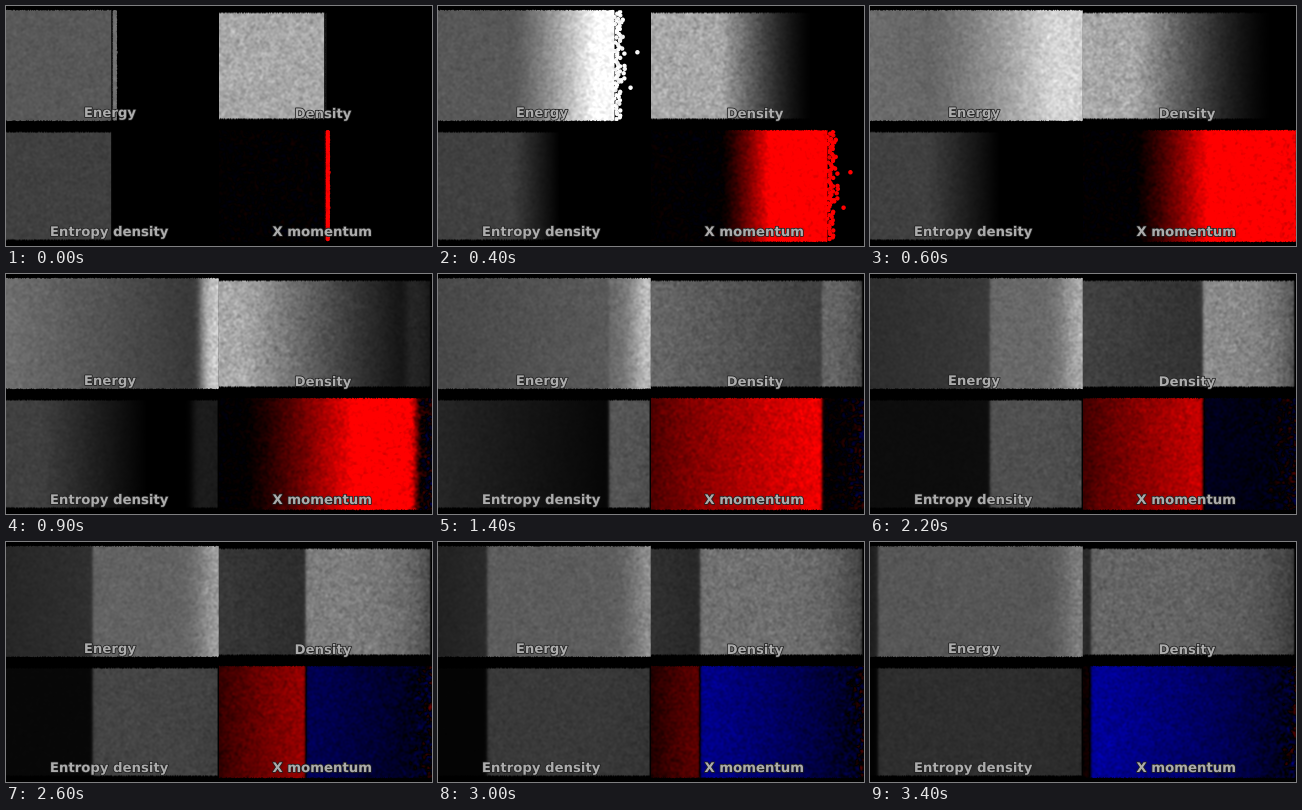
These frames come from a looping animation (426x240 px, 3500 ms). A matplotlib script:

```python
import numpy as np
import matplotlib.pyplot as plt
from matplotlib.animation import FuncAnimation
from matplotlib.patheffects import withStroke

W, H, DPI = 426, 240, 64
FRAMES, STEP = 35, 100
PW, WALL = 213, 212     # panel width, right wall
START = 106             # initial edge of the gas
SPEED = 18.5            # free front, pixels per step

x = np.arange(PW) + 0.5
d = WALL - x            # distance from the wall


def ramp(v, a, b):
    return np.clip((v - a) / (b - a), 0, 1)


def mix(a, b, k):
    return a + (b - a) * k


def shock_at(t):
    """The reflected shock leaves the wall and speeds up leftwards."""
    return 187 + 10 * max(9 - t, 0) - 1.432 * max(t - 9, 0) ** 1.5


# Each field gives the state ahead of the shock and the state behind it.
# xi is the self-similar coordinate of the expansion, u the place from the
# left wall (0) to the shock (1).

def energy(t, xi, u):
    fan = 88 + 165 * min(t, 1) * ramp(xi, -8, 13) ** 1.3
    slope = mix(-0.5, 0.25, ramp(t, 9, 13))
    late = 1000 / t * (1 + slope * u)
    glow = 120 * (1 - t / 50) * np.exp(-(d / 20) ** 2)
    behind = 104 - 18 * ramp(t, 22, 34) + glow
    return mix(fan, late, ramp(t, 5, 9)), behind


def density(t, xi, u):
    fan = 168 * ramp(xi, 14, -9) ** 1.45
    late = min(168, 1450 / t) * (1 - 5.5 / max(t, 9) * u)
    level = 146 * ramp(t, 6, 17) * (1 - 0.022 * max(t - 20, 0))
    behind = level * (1 - 0.45 * np.exp(-d / t))
    return mix(fan, late, ramp(t, 9, 13)), behind


def entropy(t, xi, u):
    fan = 64 * ramp(xi, 4, -8)
    late = 38 * np.exp((14 - t) / 7.5) * (1 - 0.85 * u * ramp(t, 22, 14))
    level = 86 * ramp(t, 7, 13) * (1 - 0.033 * max(t - 20, 0))
    behind = level * (1 - 0.1 * np.exp(-d / t))
    return mix(fan, late, ramp(t, 9, 13)), behind


def momentum(t, xi, u):
    fan = 262 * ramp(xi, -9, 3.5) ** 1.3
    peak = 245 * (1 - (max(t - 12, 0) / 23) ** 2)
    late = peak * (0.3 + 0.7 * u ** 0.8)
    reach = np.clip(d / max(WALL - shock_at(t), 20), 0, 1)
    behind = -155 * ramp(t, 20, 31) * reach ** 0.6
    return mix(fan, late, ramp(t, 9, 13)), behind


class Panel:
    def __init__(self, field, left, top, bottom, right, grain, soft, lead=0,
                 signed=False):
        self.field, self.left = field, left
        self.top, self.bottom, self.right = top, bottom, right
        self.grain, self.soft, self.lead, self.signed = grain, soft, lead, signed


PANELS = [
    Panel(energy, 0, 4, 115, 213, 0.035, 1, lead=7),
    Panel(density, 213, 6.5, 113, 211.5, 0.05, 1.8),
    Panel(entropy, 0, 126, 234, 212, 0.04, 1.8),
    Panel(momentum, 213, 124, 236, 213, 0.03, 1, lead=10, signed=True),
]

# Particles of the ragged front, then the fast strays: speed and height
rng = np.random.default_rng(4)
dot_speed = np.concatenate([rng.uniform(17.5, 19.1, 64),
                            19.2 + rng.exponential(1, 14)])
dot_y = np.concatenate([np.linspace(2, 109, 64), rng.uniform(3, 109, 14)])


def noise(rng, h):
    """Soft random field with unit variance."""
    n = rng.normal(size=(h + 4, PW + 4))
    for _ in range(2):
        n = 0.5 * n[:-2] + n[1:-1] + 0.5 * n[2:]
        n = 0.5 * n[:, :-2] + n[:, 1:-1] + 0.5 * n[:, 2:]
    return n / n.std()


def gas_mask(t, y):
    """Coverage of the gas while its front still flies to the wall."""
    mask = np.tile(np.clip(START + SPEED * t - 3 - x, 0, 1), (len(y), 1))
    for speed, cy in zip(dot_speed, dot_y):
        cx = START + speed * t
        cx -= 1.4 * max(cx - WALL, 0)
        r = np.hypot(x[None, :] - cx, y[:, None] - cy)
        mask = np.maximum(mask, np.clip(2.7 - r, 0, 1))
    return mask


def render(p, t, rng):
    y0, y1 = int(p.top) - 1, min(int(p.bottom) + 3, H)
    y = np.arange(y0, y1)[:, None] + 0.5

    s = shock_at(t)
    ahead, behind = p.field(t, (x - START) / t, np.clip(x / s, 0, 1))
    front = s + p.lead * ramp(t, 13, 9)
    width = mix(3, 0.8, ramp(t, 7, 13))
    v = mix(ahead, behind, 1 / (1 + np.exp(np.clip((front - x) / width, -40, 40))))

    near_wall = np.exp(-d / 14) * ramp(t, 5, 8)
    amp = p.grain * np.abs(v) * (1 + 0.5 * near_wall)
    if p.signed:
        amp = amp + 5 + 28 * near_wall
    field = v + amp * noise(rng, len(y))

    jitter = rng.uniform(-0.4, 0.4, (2, PW))
    for gap in (y - p.top + jitter[0], p.bottom - y + jitter[1], p.right - x):
        field = field * np.clip(gap / p.soft + 0.3, 0, 1)
    if t < 6:
        field = field * gas_mask(t, y[:, 0] - p.top)

    zero = np.zeros_like(field)
    channels = (field, zero, -field) if p.signed else (field,) * 3
    return y0, y1, np.clip(np.dstack(channels), 0, 255)


def compose(i):
    rng = np.random.default_rng(100 + i)
    img = np.zeros((H, W, 3))
    for p in PANELS:
        y0, y1, rgb = render(p, max(i, 0.15), rng)
        img[y0:y1, p.left:p.left + PW] = rgb
    return img.astype(np.uint8)


fig = plt.figure(figsize=(W / DPI, H / DPI), dpi=DPI, facecolor="black")
ax = fig.add_axes([0, 0, 1, 1])
ax.axis("off")
view = ax.imshow(compose(0), extent=(0, W, H, 0), interpolation="nearest",
                 aspect="auto")
ax.set(xlim=(0, W), ylim=(H, 0))

LABELS = [("Energy", 104, 111), ("Density", 317, 112),
          ("Entropy density", 103.2, 230), ("X momentum", 316.2, 230)]
for text, cx, base in LABELS:
    ax.text(cx, base, text, ha="center", va="baseline", color="#acacac",
            family="DejaVu Sans", weight="bold", size=13.25 * 72 / DPI,
            path_effects=[withStroke(linewidth=1.8, foreground="#202020")])


def update(i):
    view.set_data(compose(i))
    return [view]


anim = FuncAnimation(fig, update, frames=FRAMES, interval=STEP,
                     init_func=lambda: update(0), repeat=True,
                     repeat_delay=0, blit=False)
plt.show()
```
